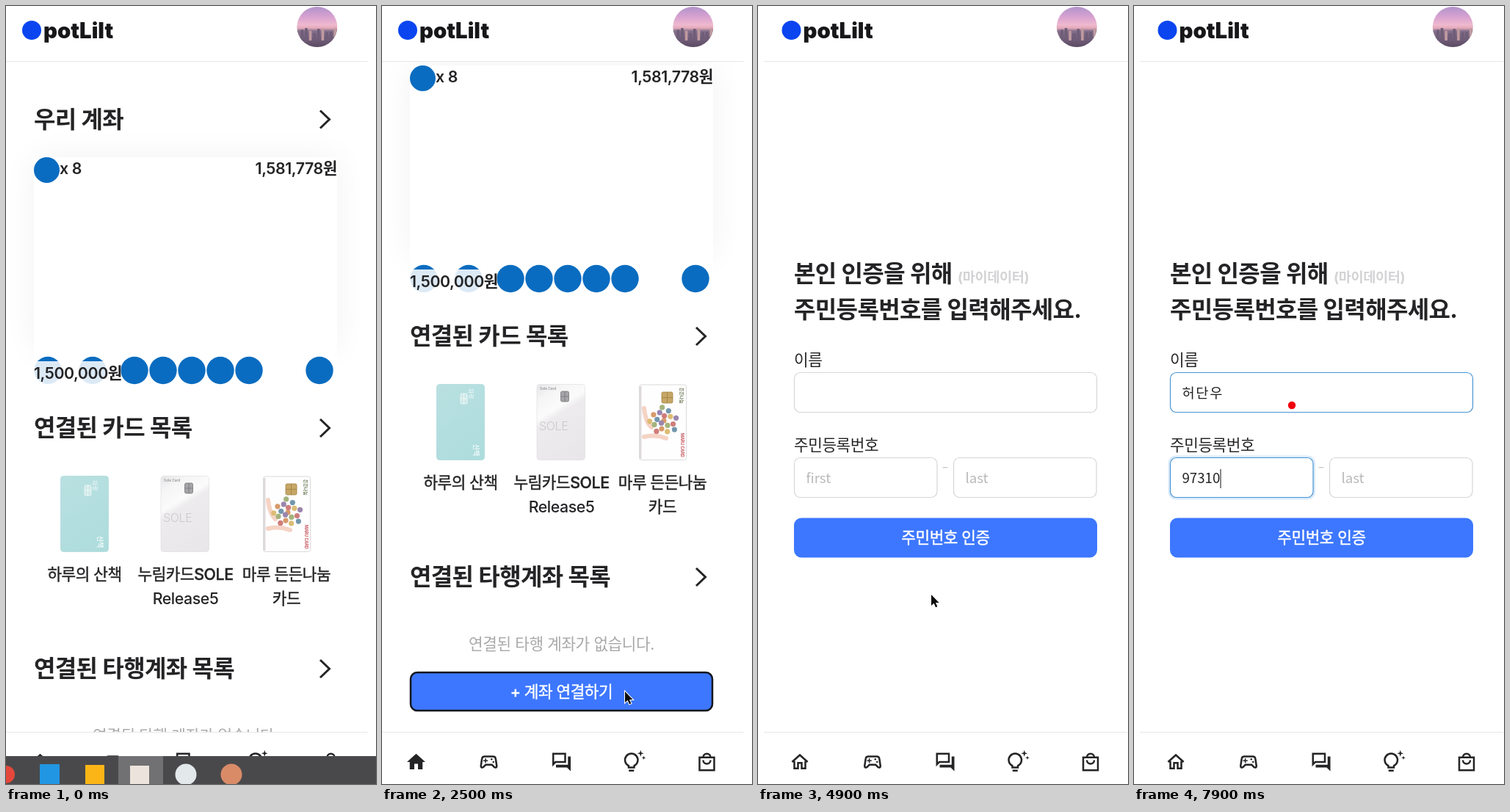
An HTML page with a canvas that plays this animation: 504 by 1060 pixels, repeating every 8 s.

```html
<!DOCTYPE html>
<html lang="ko">
<head>
<meta charset="utf-8">
<title>계좌 연결하기</title>
<style>
html, body { margin: 0; width: 100%; height: 100%; overflow: hidden; background: #fff; }
canvas { display: block; width: 504px; height: 1060px; }
</style>
</head>
<body>
<canvas id="stage"></canvas>
<script>
const W = 504, H = 1060, LOOP = 8000, STEP = 100;
const INK = '#242426', BLUE = '#3d77ff', LINE = '#e6e6e6';
const UI = "Inter, 'Noto Sans CJK KR', sans-serif";
const FIELD = "'Noto Sans CJK KR', 'Noto Sans', sans-serif";
const TITLE = 32, BODY = 21.33;

const canvas = document.getElementById('stage');
const dpr = window.devicePixelRatio || 1;
canvas.width = W * dpr;
canvas.height = H * dpr;
const c = canvas.getContext('2d');

// ---------- helpers ----------
const clamp = v => Math.max(0, Math.min(1, v));
const ease = v => v * v * (3 - 2 * v);
const ramp = (t, a, b) => ease(clamp((t - a) / (b - a)));
const hasHangul = s => /[ㄱ-힣]/.test(s);

// Value of the last entry [time, value] that has started.
function latest(list, t, start) {
  let v = start;
  for (const [at, value] of list) if (t >= at) v = value;
  return v;
}

// y is the visual middle of the line.
function text(s, x, y, o = {}) {
  const { size = BODY, weight = 500, color = INK, align = 'left', font = UI, gap = -0.02 } = o;
  const base = y + size * 0.365;
  c.font = `${weight} ${size}px ${font}`;
  c.letterSpacing = gap * size + 'px';
  c.textAlign = align;
  c.fillStyle = color;
  c.fillText(s, x, base);
  // Hangul has no medium cut, so a hairline outline adds the weight.
  if (weight === 500 && hasHangul(s)) {
    c.strokeStyle = color;
    c.lineWidth = size * 0.02;
    c.strokeText(s, x, base);
  }
  return c.measureText(s).width;
}

function circle(x, y, r, color) {
  c.fillStyle = color;
  c.beginPath();
  c.arc(x, y, r, 0, 7);
  c.fill();
}

function box(x, y, w, h, r, fill, stroke, lw = 1) {
  c.beginPath();
  c.roundRect(x, y, w, h, r);
  if (fill) { c.fillStyle = fill; c.fill(); }
  if (stroke) { c.strokeStyle = stroke; c.lineWidth = lw; c.stroke(); }
}

function rect(x, y, w, h, color) {
  c.fillStyle = color;
  c.fillRect(x, y, w, h);
}

function at(x, y, scale, draw) {
  c.save();
  c.translate(x, y);
  c.scale(scale, scale);
  draw();
  c.restore();
}

function gradient(x0, y0, x1, y1, ...stops) {
  const g = c.createLinearGradient(x0, y0, x1, y1);
  stops.forEach(([p, color]) => g.addColorStop(p, color));
  return g;
}

function button(label, x, y, focused, weight = 500) {
  box(x, y, 413, 54, 10, BLUE);
  if (focused) box(x + 1, y + 1, 411, 52, 9, null, '#15161c', 2.5);
  text(label, x + 206.5, y + 27, { color: '#fff', align: 'center', weight });
}

function heading(label, y) {
  text(label, 38, y, { size: TITLE, weight: 700 });
  c.strokeStyle = INK;
  c.lineWidth = 3;
  c.beginPath();
  c.moveTo(428, y - 11.5);
  c.lineTo(440.5, y + 0.5);
  c.lineTo(428, y + 12.5);
  c.stroke();
}

// ---------- header and navigation ----------
function header() {
  rect(-12, 0, 520, 75, '#fff');
  rect(-2.5, 75, 495, 1, LINE);
  circle(35, 33, 13, '#0a45f0');
  text('potLilt', 51, 33, { size: 29.3, weight: 900, color: '#17171a', gap: 0 });
  c.save();
  c.beginPath();
  c.arc(423.8, 28.5, 27.5, 0, 7);
  c.clip();
  rect(395, 0, 58, 58, gradient(0, 1, 0, 56, [0, '#b193cb'], [0.25, '#d7a2d0'],
    [0.45, '#efb9cf'], [0.53, '#e3a9b8'], [0.6, '#84708c'], [1, '#5c4a63']));
  for (let i = 0; i < 10; i++) {
    const h = 8 + 9 * Math.abs(Math.sin(i * 2.3));
    rect(396 + i * 5.6, 47 - h, 3.6, h, i % 3 ? '#6f5d78' : '#c09aa0');
  }
  c.restore();
}

const homeFull = new Path2D('M10 20v-6h4v6h5v-8h3L12 3 2 12h3v8z');
const homeLine = new Path2D('M6 11v8h4v-6h4v6h4v-8M3.5 12L12 4.4l8.5 7.6');
const pad = new Path2D('M7.5 6h9q2.7 0 3 2.6l1.1 7.7q0 1.7-1.6 1.7-.6 0-1.1-.5L15.4 15H8.6l-2.5 2.5' +
  'q-.5.5-1.1.5-1.6 0-1.6-1.7l1.1-7.7Q4.8 6 7.5 6z');
const padCross = new Path2D('M8.5 8v5M6 10.5h5');
const chat = new Path2D('M3 14.5V3h13v9H5.5z');
const chatBack = new Path2D('M19 6h3v16l-4-4H6v-3h13z');
const bulb = new Path2D('M6 16.2a7 7 0 1 1 6 0v1.8H6zM6.2 21.4h5.6');
const bag = new Path2D('M4 7h16v14H4zM8 7a4 4 0 0 1 8 0M8 10a4 4 0 0 0 8 0');

function star(x, y, r) {
  c.beginPath();
  for (let i = 0; i < 8; i++) {
    const a = i * Math.PI / 4, d = i % 2 ? r * 0.35 : r;
    c.lineTo(x + d * Math.cos(a), y + d * Math.sin(a));
  }
  c.fill();
}

function nav(home) {
  rect(-12, 989, 520, 71, '#fff');
  rect(-2.5, 989, 495, 1, LINE);
  const icons = [
    () => home ? c.fill(homeFull) : c.stroke(homeLine),
    () => {
      c.stroke(pad);
      c.lineWidth = 1.2;
      c.stroke(padCross);
      circle(15, 9, 1, INK);
      circle(17, 12, 1, INK);
    },
    () => { c.stroke(chat); c.fill(chatBack); },
    () => { c.stroke(bulb); star(19, 2.6, 3.6); star(22.4, 7.4, 2.2); },
    () => c.stroke(bag)
  ];
  icons.forEach((draw, i) => at(31.5 + i * 99, 1015, 1.25, () => {
    c.strokeStyle = c.fillStyle = INK;
    c.lineWidth = 2;
    draw();
  }));
}

// ---------- overview page ----------
function accountBox() {
  c.save();
  c.shadowColor = 'rgba(0,0,0,.055)';
  c.shadowBlur = 42;
  rect(38, 206, 413, 262, '#fff');
  c.restore();
  rect(38, 206, 413, 310, '#fff');
  const mark = '#0a6cc0';
  circle(55.5, 223.5, 17.5, mark);
  text('x 8', 73, 221, { weight: 600 });
  text('1,581,778원', 451, 221, { weight: 600, align: 'right' });
  [57, 118, 175, 214, 253, 292, 331, 427].forEach(x => circle(x, 496.5, 18.7, mark));
  rect(38, 484, 118.5, 32, 'rgba(255,255,255,.86)');
  text('1,500,000원', 38, 500, { weight: 600 });
}

function chip(x, y, w, h, fill, edge) {
  box(x, y, w, h, 2, fill, edge, 0.8);
  c.beginPath();
  c.moveTo(x, y + h / 2);
  c.lineTo(x + w, y + h / 2);
  c.moveTo(x + w / 2, y);
  c.lineTo(x + w / 2, y + h);
  c.stroke();
}

function sideways(s, x, y, size, color) {
  c.save();
  c.translate(x, y);
  c.rotate(Math.PI / 2);
  text(s, 0, 0, { size, color, weight: 600 });
  c.restore();
}

function cards() {
  box(74.5, 640.5, 65, 103, 4, gradient(74, 640, 140, 744, [0, '#b9e0e1'], [1, '#addcdd']), '#a5d3d5', 0.6);
  chip(107, 653, 9, 14, '#cfe9e8', '#f4fafa');
  sideways('하루', 121, 646, 8, '#e2f3f3');
  sideways('산책', 128, 722, 9, '#eef8f8');

  box(211, 640.5, 65.5, 103, 4, gradient(211, 640, 276, 744, [0, '#e6e4e6'], [0.16, '#f6f5f6'],
    [0.34, '#fbfbfb'], [0.42, '#edebed'], [1, '#e8e6e8']), '#dddcde', 0.6);
  chip(243.5, 650, 11, 14, '#a5a5a8', '#78787c');
  text('SOLE', 214, 697, { size: 16, weight: 300, color: '#cbc9cd' });
  text('Sole Card', 215, 646, { size: 5, color: '#8c8c90' });

  box(350.5, 641, 64, 102.5, 3, '#fefefe', '#dcdadb', 1);
  rect(350.5, 643, 3, 99, '#dedadb');
  chip(381, 651, 15, 15, '#c6a767', '#a3813f');
  c.strokeStyle = '#f5d3c5';
  c.lineWidth = 6;
  c.lineCap = 'round';
  c.beginPath();
  c.moveTo(357, 673);
  c.quadraticCurveTo(359, 692, 367, 699);
  c.moveTo(357, 712);
  c.quadraticCurveTo(372, 708, 387, 714);
  c.stroke();
  c.lineCap = 'butt';
  const dots = ['#d79a6a', '#9a86ad', '#cf7d7a', '#a3b37c', '#7396ad', '#dcbc74'];
  for (let i = 0; i < 18; i++) {
    const a = i * 2.4, r = 4.7 * Math.sqrt(i);
    circle(384 + r * Math.cos(a), 690 + r * Math.sin(a), 3.6, dots[i % 6]);
  }
  sideways('든든나눔', 408, 645, 6, '#6f7a58');
  sideways('MARU CARD', 409, 707, 5.5, '#c4444c');

  const label = { align: 'center' };
  text('하루의 산책', 107, 774, label);
  text('누림카드SOLE', 244.5, 774, label);
  text('Release5', 244.5, 807, label);
  text('마루 든든나눔', 382, 774, label);
  text('카드', 382, 807, label);
}

function overview(t) {
  const scroll = 46 * ramp(t, 1500, 1800) + 79 * ramp(t, 1800, 2200);
  c.save();
  c.translate(0, -Math.round(scroll));
  heading('우리 계좌', 154);
  accountBox();
  heading('연결된 카드 목록', 574.5);
  cards();
  heading('연결된 타행계좌 목록', 902.5);
  text('연결된 타행 계좌가 없습니다.', 244.5, 994, { weight: 400, color: '#a9a9ab', align: 'center' });
  button('+ 계좌 연결하기', 38, 1032, t >= 2500);
  c.restore();
}

// ---------- bank selection page ----------
const banks = [
  ['다온', '#1673b8', 35], ['새봄', '#1673b8', 35], ['한별', '#fdb31b', 27], ['가람', '#1f78b9', 0],
  ['늘솔', '#fdb31b', 29], ['해담', '#0768b2', 32.5], ['이든', '#0584cd', 35.5]
];

function toggle(y, on) {
  box(389, y - 15, 60, 30, 15, on > 0.5 ? '#1677ff' : '#bfbfbf');
  c.save();
  c.shadowColor = 'rgba(0,35,11,.25)';
  c.shadowBlur = 5;
  c.shadowOffsetY = 2;
  circle(404 + 30.5 * on, y - 0.5, 12.2, '#fff');
  c.restore();
}

function selection(t) {
  const all = t >= 3700, on = ramp(t, 3600, 3900);
  const hover = t >= 3300 && t < 4000;
  text('계좌 연결하기', 38, 140, { size: TITLE, weight: 700 });
  text('연결할 은행을 선택해 주세요.', 38, 203, { weight: 400 });
  box(38.5, 242.5, 412, 54, 10, '#f9f9f9', hover && '#a6a2f0');
  text(all ? '전체 선택 해제' : '전체 선택', 244.5, 269.5, { color: '#111', align: 'center' });
  banks.forEach(([name, color, r], i) => {
    const y = Math.round(347.8 + i * 84.6);
    if (r) circle(76, y, r, color);
    else box(44, y - 32, 64, 64, 5, color);
    text(name, 142, y + 0.5);
    toggle(Math.round(352.6 + i * 84.6), on);
  });
  circle(74, 915, 6, '#d0252f');
  button(all ? '21개 은행 선택' : '0개 은행 선택', 38, 922, t >= 4400);
}

// ---------- identity page ----------
const nameTyping = [[5700, 'g'], [6100, ''], [6200, 'ㅎ'], [6300, '허'], [6400, '헏'], [6500, '허다'],
  [6600, '허단'], [6800, '허단ㅇ'], [6900, '허단우']];
const numberTyping = [[7300, '9'], [7500, '97'], [7600, '973'], [7700, '9731'], [7800, '97310']];

function field(x, y, w, value, hint, focus, active) {
  if (focus) box(x - 1.5, y - 1.5, w + 3, 57, 9, null, '#d9eafb', 3);
  box(x, y, w, 54, 8, '#fff', focus || active ? '#4a95d2' : '#d6d6d6', 1.2);
  const gap = hasHangul(value) ? 0.09 : 0;
  const o = { size: 18.67, weight: 300, font: FIELD, gap, color: value ? '#222' : '#b9b9b9' };
  const width = text(value || hint, x + 16, y + 28, o);
  if (focus) rect(Math.round(x + 16.5 + (value ? width : 0)), y + 15.5, 1, 26, '#111');
}

function identity(t) {
  const name = latest(nameTyping, t, ''), number = latest(numberTyping, t, '');
  const first = t >= 7100;
  text('본인 인증을 위해', 38.5, 364.5, { size: TITLE, weight: 700 });
  text('(마이데이터)', 261.5, 369.5, { size: 18.67, weight: 700, color: '#d3d3d5' });
  text('주민등록번호를 입력해주세요.', 38.5, 413, { size: TITLE, weight: 700 });
  text('이름', 38.5, 482, { weight: 400 });
  field(39, 499.5, 412, name, '', t >= 5500 && !first, t >= 5300);
  text('주민등록번호', 38.5, 598, { weight: 400 });
  field(39, 615.5, 194.5, number, 'first', first);
  rect(241, 628, 7, 1.5, '#cfcfcf');
  field(256, 615.5, 194.5, '', 'last');
  button('주민번호 인증', 38.5, 697.5, false);
}

// ---------- pointer and taskbar ----------
const arrow = new Path2D('M0 0v15l3.6-3.2 2.4 5.4 2.4-1-2.4-5.3h4.6z');
const hand = new Path2D('M4 1.6q2-1.6 3.4.4v6.6l7 2q1.8.6 1.6 2.6l-.8 5-1.6 4.2H6.2L.4 14.6Q-.8 12.4 1.4 12L4 13.6z');
const route = [[1000, 488, 1012], [1300, 440, 955], [1500, 440, 955], [1800, 385, 903], [2300, 331, 934],
  [2700, 331, 934], [3300, 298, 284], [3800, 298, 284], [4200, 257, 944], [4700, 257, 944],
  [5100, 215, 660], [5400, 215, 544]];

function pointer(t) {
  if (t < route[0][0]) return;
  let [, x, y] = route[route.length - 1];
  for (let i = 1; i < route.length; i++) {
    const [t0, x0, y0] = route[i - 1], [t1, x1, y1] = route[i];
    if (t >= t1) continue;
    const k = ramp(t, t0, t1);
    x = x0 + (x1 - x0) * k;
    y = y0 + (y1 - y0) * k;
    break;
  }
  if (t >= 5100) return circle(x, y, 5.2, '#f0000c');
  const shape = (t >= 3300 && t < 3900) || (t >= 4200 && t < 4700) ? hand : arrow;
  at(shape === hand ? x - 5 : x, y, 1, () => {
    c.strokeStyle = '#fff';
    c.lineWidth = 2;
    c.stroke(shape);
    c.fillStyle = '#0b0b0b';
    c.fill(shape);
  });
}

function taskbar(t) {
  const y = 1022 + 38 * ramp(t, 100, 500);
  if (y >= H) return;
  rect(0, y, W, 38, '#49494b');
  rect(153, y, 61, 38, '#717173');
  circle(0, y + 25, 12, '#e5483b');
  rect(46, y + 11, 27, 27, '#2196e3');
  rect(108, y + 12, 26, 26, '#fbb516');
  rect(169, y + 13, 26, 25, '#ece4dc');
  circle(245, y + 25, 14.5, '#e3e8ea');
  circle(307, y + 25, 14.5, '#d98b68');
}

// ---------- frame ----------
function frame(now) {
  const t = Math.floor(now % LOOP / STEP) * STEP;
  const page = t < 2700 ? overview : t < 4700 ? selection : identity;
  c.setTransform(dpr, 0, 0, dpr, 0, 0);
  rect(0, 0, W, H, '#fff');
  c.save();
  if (page === identity) c.translate(10.5, 0);
  page(t);
  header();
  nav(page === overview);
  c.restore();
  pointer(t);
  taskbar(t);
  requestAnimationFrame(frame);
}
requestAnimationFrame(frame);
</script>
</body>
</html>
```
